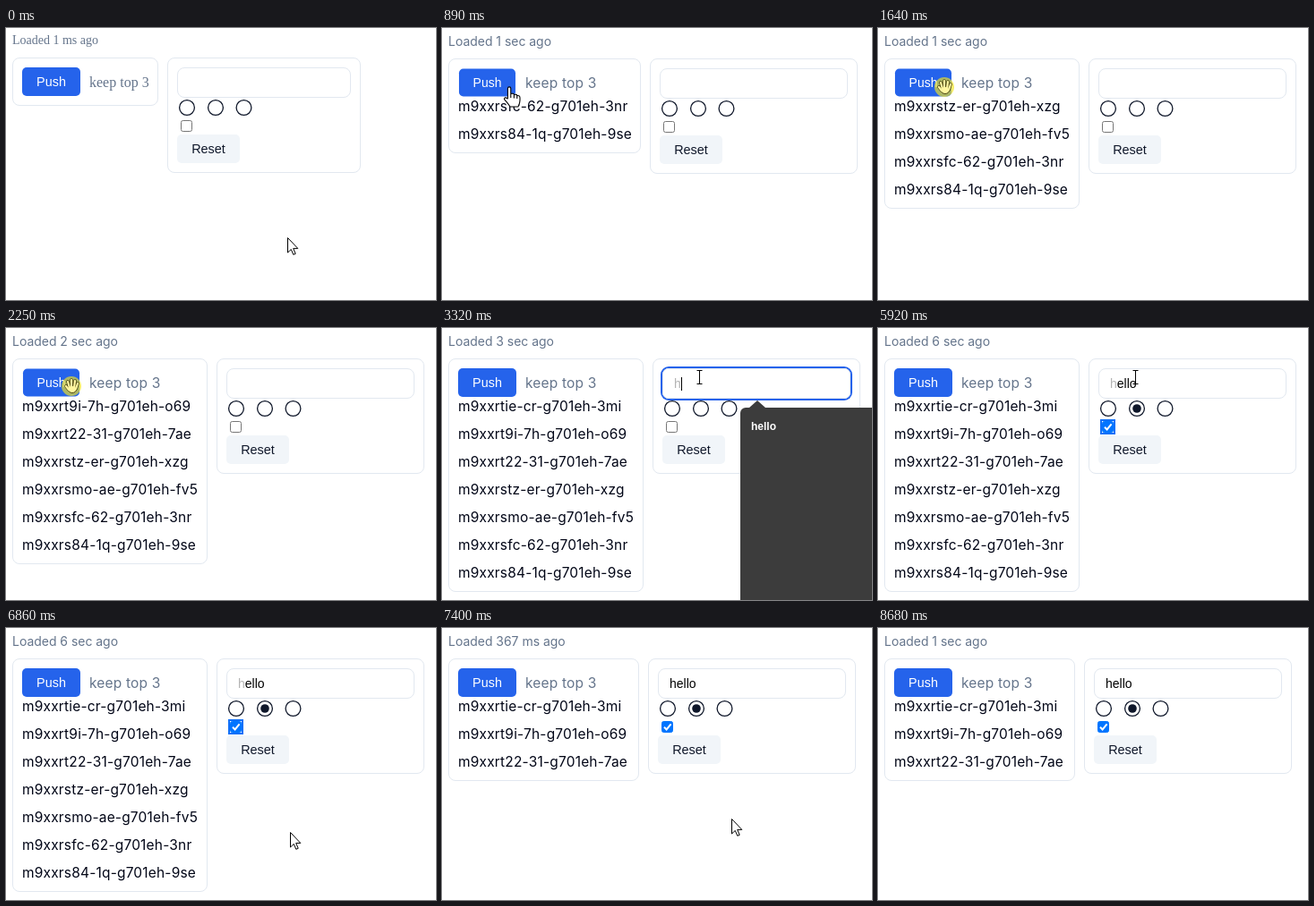
Animation of 480 by 304 pixels, one loop 8810 ms. Source, as an HTML page:

```html
<!DOCTYPE html>
<html lang="en">
<head>
<meta charset="utf-8">
<title>Push list demo</title>
<style>
  html, body { margin: 0; width: 100%; height: 100%; overflow: hidden; background: #fff; }
  #stage { position: absolute; left: 0; top: 0; width: 480px; height: 304px; overflow: hidden; }
  #page { position: absolute; inset: 0; font: 15.5px Inter, sans-serif; letter-spacing: .18px; color: #020617; }
  #page.plain { top: -1px; font: 16px "Liberation Serif", serif; letter-spacing: 0; }
  #page div, #page svg { position: absolute; box-sizing: border-box; white-space: pre; }
  #loaded { left: 7px; top: 5px; font-size: 14px; line-height: 20px; letter-spacing: -.03px; color: #64748b; }
  .plain #loaded { letter-spacing: 0; }
  .panel { top: 34px; border: 1px solid #e2e8f0; border-radius: 8px; }
  #list { left: 7px; }
  #form { height: 129px; }
  #keep { left: 93px; top: 46px; line-height: 31px; color: #64748b; }
  .row { left: 18px; line-height: 31px; }
  .button { height: 32px; border-radius: 5px; text-align: center; letter-spacing: 0;
    font: 14.4px/32px "Liberation Sans", sans-serif; }
  #push { left: 18px; top: 45px; width: 65px; background: #2563eb; color: #fff; }
  #reset { left: 10px; top: 85px; width: 70px; background: #f1f5f9; color: #0f172a; }
  #field { left: 10px; top: 10px; height: 34px; border: 1px solid #e2e8f0; border-radius: 8px; padding-left: 12px;
    font: 14px/32px "Liberation Sans", sans-serif; letter-spacing: 0; color: #000; }
  #field.focus { border-radius: 7px; box-shadow: 0 0 0 2px #2563eb; }
  #caret { position: absolute; display: inline-block; width: 1px; height: 15px; top: 9px; background: #000; }
  #controls { left: -1px; top: -1px; overflow: visible; }
  #popup { left: 333px; top: 89px; width: 170px; background: #3c3c3c; border-radius: 6px;
    padding-left: 12px; font: bold 12px/42px "Liberation Sans", sans-serif; letter-spacing: 0; color: #fff; }
  #popup::before { content: ""; position: absolute; left: 10px; top: -8px; border: 9px solid transparent;
    border-top: 0; border-bottom: 8px solid #3c3c3c; }
  #pointer { position: absolute; left: 0; top: 0; overflow: visible; }
</style>
</head>
<body>
<div id="stage">
  <div id="page">
    <div id="loaded"></div>
    <div id="list" class="panel"></div>
    <div id="keep">keep top 3</div>
    <div id="rows"></div>
    <div id="push" class="button">Push</div>
    <div id="form" class="panel">
      <div id="field"><span id="first"></span><span id="rest"></span><span id="caret"></span></div>
      <svg id="controls" width="120" height="129">
        <g fill="none" stroke="#0f172a" stroke-width="1.3">
          <circle cx="22" cy="56" r="8.4"/><circle cx="54" cy="56" r="8.4"/><circle cx="85.5" cy="56" r="8.4"/>
        </g>
        <circle id="dot" cx="54" cy="56" r="4.8" fill="#0f172a"/>
        <circle id="ring" cy="56" r="12" fill="none" stroke="#2563eb" stroke-width="2"/>
        <rect id="boxRing" x="14" y="69" width="15" height="15" fill="none" stroke="#1070f8" stroke-width="2"/>
        <rect id="box" x="15.5" y="70.5" width="12" height="12" rx="2"/>
        <path id="tick" d="M18 76.8l2.6 2.6 5-6" fill="none" stroke="#fff" stroke-width="2"/>
      </svg>
      <div id="reset" class="button">Reset</div>
    </div>
    <div id="popup">hello</div>
  </div>
  <svg id="pointer" width="1" height="1">
    <path id="arrow" d="M.5 .5V17L4.3 13.4L6.8 19.3L9.2 18.3L6.7 12.4H11.8Z" fill="#fff" stroke="#000"/>
    <path id="beam" d="M-2.5 -7.5H3.5M.5 -7.5V7.5M-2.5 7.5H3.5" fill="none" stroke="#000"/>
    <g id="hand" fill="#fff" stroke="#000" stroke-width="1.1" stroke-linejoin="round">
      <path d="M-1.6 13V1.6A1.7 1.7 0 0 1 1.8 1.6V7.5Q5 6.5 5.4 8.6Q8.4 7.6 8.8 9.6Q12 9 12 12V15Q12 18 10 22H1Q-1 18.5 -5.5 13.6Q-5.5 10.5 -1.6 13Z"/>
      <path d="M1.8 8V12M5.4 9V12.5M8.8 10V13"/>
    </g>
    <g id="click" stroke-linecap="round">
      <circle cy="1" r="11" fill="#f5e51e" fill-opacity=".65"/>
      <g id="palm">
        <path d="M-6 1L-3 5M-4 -4L-2 3M0 -6V3M4 -5L3 3M7 -2L5 4" stroke="#4a4410" stroke-width="3.6"/>
        <ellipse cx="1" cy="4.5" rx="4.8" ry="4" fill="#fff6a0" stroke="#4a4410"/>
        <path d="M-6 1L-3 5M-4 -4L-2 3M0 -6V3M4 -5L3 3M7 -2L5 4" stroke="#fff6a0" stroke-width="2.2"/>
      </g>
    </g>
  </svg>
</div>
<script>
const LOOP = 8810, RELOAD = 7200, FONT_READY = 70;
const ids = ["s84-1q-g701eh-9se", "sfc-62-g701eh-3nr", "smo-ae-g701eh-fv5", "stz-er-g701eh-xzg",
  "t22-31-g701eh-7ae", "t9i-7h-g701eh-o69", "tie-cr-g701eh-3mi"].map(s => "m9xxr" + s);
const pushes = [610, 870, 1134, 1397, 1688, 1956, 2276];
const path = [ // time, x, y
  [0, 314, 234], [40, 314, 234], [540, 76, 64], [890, 75, 66], [1400, 74, 65], [2250, 73, 64], [2330, 73, 64],
  [2620, 287, 55], [6340, 287, 55], [6780, 315, 234], [7000, 323, 213], [7450, 323, 213], [8210, 452, 304]
];
const $ = id => document.getElementById(id);
const show = (id, on) => $(id).style.display = on ? "" : "none";
const within = (t, a, b) => t >= a && t < b;
const clamp = v => Math.min(1, Math.max(0, v));

function pointerAt(t) {
  const i = path.findIndex(k => k[0] > t);
  if (i < 0) return path[path.length - 1].slice(1);
  const [a, x, y] = path[i - 1], [b, u, v] = path[i];
  const p = (t - a) / (b - a), e = p * p * (3 - 2 * p);
  return [x + (u - x) * e, y + (v - y) * e];
}

function ageText(t) {
  if (t < FONT_READY) return "1 ms";
  const start = t < RELOAD ? FONT_READY : RELOAD;
  const tick = start + Math.floor((t - start) / 66.6) * 66.6;
  const age = Math.round(tick + (t < RELOAD ? 140 : -7033));
  return age < 1000 ? age + " ms" : Math.floor(age / 1000) + " sec";
}

let shown = "";
function drawList(t, plain, reloaded) {
  const count = pushes.filter(p => p <= t).length;
  const list = ids.slice(reloaded ? -3 : 0, count).reverse();
  const n = list.length;
  const right = plain ? 170 : reloaded ? 220 : [182, 222, 222][n] || 225;
  $("list").style.width = right - 7 + "px";
  $("list").style.height = (n ? 44 + 31 * n : 54) + "px";
  $("form").style.left = right + 10 + "px";
  $("form").style.width = (plain ? 216 : 232) + "px";
  $("field").style.width = (plain ? 194 : 210) + "px";
  if (shown === list.join()) return;
  shown = list.join();
  $("rows").innerHTML = list.map((s, i) => `<div class="row" style="top:${72 + 31 * i}px">${s}</div>`).join("");
}

function drawForm(t, reloaded) {
  const focus = within(t, 2690, 4130);
  const text = "hello".slice(0, t < 3320 ? 0 : 1 + Math.floor((t - 3320) / 100));
  $("field").className = focus ? "focus" : "";
  $("first").textContent = text.slice(0, 1);
  $("first").style.color = reloaded ? "#000" : "#b4b4b4";
  $("rest").textContent = text.slice(1);
  show("caret", focus);

  show("dot", t >= 4730);
  show("ring", within(t, 4130, 5390));
  $("ring").setAttribute("cx", t < 4730 ? 22 : 54);
  const checked = t >= 5720;
  show("boxRing", within(t, 5390, RELOAD));
  $("box").setAttribute("fill", checked ? "#0075ff" : "#fff");
  $("box").setAttribute("stroke", checked ? "#0075ff" : "#767676");
  show("tick", checked);

  $("popup").style.opacity = Math.min(clamp((t - 2750) / 150), clamp((4096 - t) / 226));
  $("popup").style.height = (t < 3390 ? 230 : 42) + "px";
}

function drawPointer(t) {
  const [x, y] = pointerAt(t);
  const overPush = x > 18 && x < 83 && y > 45 && y < 77;
  const overField = t > 2300 && x > 246 && x < 456 && y > 45 && y < 79;
  const pressing = pushes.some(p => within(t, p - 90, p));
  const clicking = pressing || within(t, 2630, 2700);
  const held = pushes.some(p => within(t, p - 90, p + 50));
  $("push").style.transform = held ? "scale(.97)" : "";
  $("pointer").style.transform = `translate(${Math.round(x)}px,${Math.round(y)}px)`;
  show("pointer", t < 8210);
  show("click", clicking);
  show("palm", pressing);
  show("hand", overPush && !pressing);
  show("beam", overField);
  show("arrow", !overPush && !overField);
}

function draw(t) {
  const plain = t < FONT_READY, reloaded = t >= RELOAD;
  $("page").className = plain ? "plain" : "";
  $("loaded").textContent = `Loaded ${ageText(t)} ago`;
  drawList(t, plain, reloaded);
  drawForm(t, reloaded);
  drawPointer(t);
}

const begin = performance.now();
function frame() {
  draw((performance.now() - begin) % LOOP);
  requestAnimationFrame(frame);
}
frame();
</script>
</body>
</html>
```
